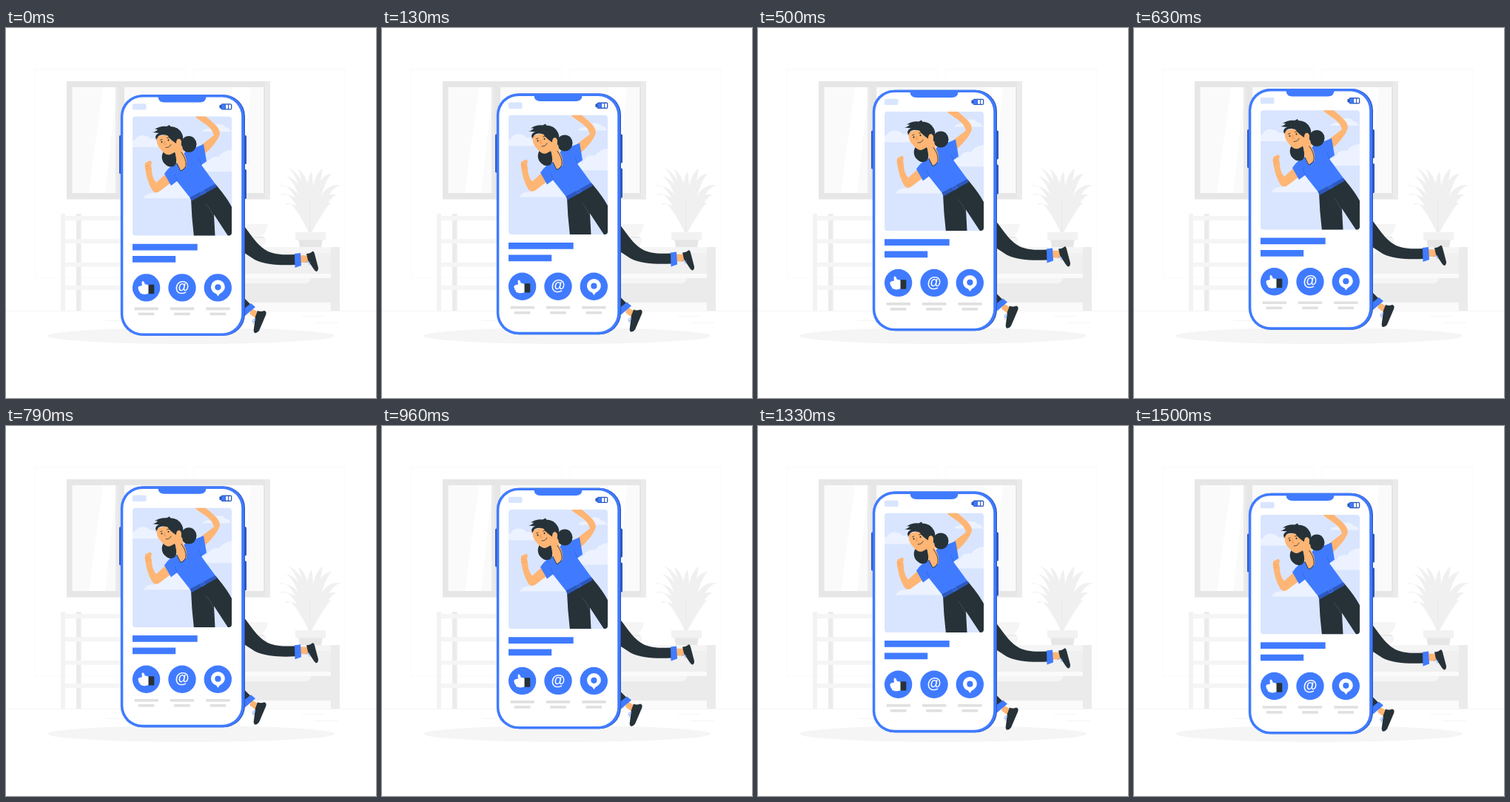
Recreate the animation shown at these times as an HTML page with a canvas. Size 500 px wide and 500 px high, loop 1.54 s.

```html
<!DOCTYPE html>
<html lang="en">
<head>
<meta charset="utf-8">
<title>Floating phone</title>
<style>
html, body { margin: 0; width: 100%; height: 100%; overflow: hidden; background: #fff; }
canvas { display: block; width: 500px; height: 500px; }
</style>
</head>
<body>
<canvas id="stage"></canvas>
<script>
const canvas = document.getElementById('stage');
const ctx = canvas.getContext('2d');
const ratio = window.devicePixelRatio || 1;
canvas.width = canvas.height = 500 * ratio;

const BLUE = '#407bff', NAVY = '#2d58bd', DARK = '#263238', SKIN = '#ffb573';
const SKY = '#d9e5ff', CLOUD = '#ecf2ff', WHITE = '#fff';
const LOOP = 1540, STEPS = 37, STEP = 1000 / 24, LIFT = 10;

function fill(d, color) {
  ctx.fillStyle = color;
  ctx.fill(new Path2D(d));
}

function line(d, color, width = 1) {
  ctx.strokeStyle = color;
  ctx.lineWidth = width;
  ctx.lineCap = ctx.lineJoin = 'round';
  ctx.stroke(new Path2D(d));
}

function box(x, y, right, bottom, color, radius = 0) {
  ctx.fillStyle = color;
  ctx.beginPath();
  ctx.roundRect(x, y, right - x, bottom - y, radius);
  ctx.fill();
}

function oval(x, y, rx, color, ry = rx) {
  ctx.fillStyle = color;
  ctx.beginPath();
  ctx.ellipse(x, y, rx, ry, 0, 0, Math.PI * 2);
  ctx.fill();
}

function drawWindow() {
  box(82, 72, 357, 231.5, '#e6e6e6');
  box(350, 72, 357, 231.5, '#ebebeb');
  box(89.5, 80, 148, 223, '#fafafa');
  box(160, 80, 348.5, 223, '#fafafa');
  fill('M131 80H148V95L134 223H112Z', WHITE);
  fill('M306 80H331L316 223H290Z', WHITE);
  box(148, 80, 152, 223, '#ebebeb');
  box(348.5, 80, 350, 223, '#e0e0e0');
}

function drawShelf() {
  box(95, 251, 101.5, 382, '#ebebeb');
  for (const y of [254, 285.3, 316.8, 348]) box(74, y, 160, y + 6, '#f5f5f5');
  box(74, 251, 80, 382, '#f3f3f3');
}

function drawCabinet() {
  box(300, 296, 451, 382, '#f5f5f5');
  box(439, 296, 451, 382, '#ebebeb');
  box(300, 304, 439, 332, '#f0f0f0');
  box(300, 332, 439, 338, '#fafafa');
  fill('M300 345H406Q411 344 412 338H439V371H300Z', '#ebebeb');
  box(300, 371, 439, 382, '#fafafa');
  fill('M310 265H354Q352 277 345 281L351 284V290L346 296H310Z', '#f5f5f5');
  box(310, 282, 349, 284, '#ebebeb');
}

function drawPlant() {
  // Each leaf: tip x, tip y, bend x, bend y
  const leaves = [
    [380, 188, 404, 198], [371, 199, 398, 194], [368, 214, 392, 202],
    [370, 226, 391, 213], [377, 239, 390, 226], [394, 190, 407, 198],
    [413, 194, 408, 208], [428, 190, 416, 200], [441, 197, 421, 196],
    [454, 213, 429, 204], [448, 226, 430, 217], [440, 237, 428, 228]
  ];
  for (const [x, y, bx, by] of leaves) {
    fill(`M409 276Q${bx - 6} ${by} ${x} ${y}Q${bx + 9} ${by + 5} 413 276Z`, '#f0f0f0');
  }
  line('M411 276V235', '#ebebeb', 1.5);
  fill('M395 285H428L426 296H397Z', '#e6e6e6');
  box(391, 276, 432, 286.5, '#f2f2f2', 1);
}

function drawRoom() {
  ctx.fillStyle = WHITE;
  ctx.fillRect(0, 0, 500, 500);
  line('M39.5 55.5H243V337.5H39.5ZM254.5 55.5H458V337.5H254.5Z', '#fafafa');
  box(0, 382, 500, 382.5, '#ebebeb');
  box(135, 395, 160, 395.5, '#ebebeb');
  box(400, 389.5, 430, 390, '#ebebeb');
  box(417, 398, 449, 398.5, '#ebebeb');
  drawWindow();
  drawShelf();
  drawCabinet();
  drawPlant();
  oval(250, 416, 194, '#f5f5f5', 11);
}

function drawLegs() {
  fill('M397 307L408 307.5V317L397 317Z', SKIN);
  fill('M310 255L322 268C336 286 344 301 364 305C374 307 382 306 392 306L391 320C370 321 350 320 336 313L310 296Z', DARK);
  fill('M390 305L398 304L399 321L390.5 324Z', BLUE);
  fill('M406 305Q411 305 414 302Q416 301 417 305L422 324Q422 329 419 329Q417 328 414 323L408 314Z', DARK);
  line('M405 317Q408 314 411 317M409 316L410 320', '#6f9cff', .7);

  fill('M332 379L341 384L337 392L329 386Z', SKIN);
  fill('M310 354L322 365L331 374L324 382L310 380Z', DARK);
  fill('M331 372L337 377L323 389L317 383Z', BLUE);
  fill('M340 382Q344 384 349 382Q353 383 351 388L342 409Q339 413 336 412Q334 410 335 406L337 390Z', DARK);
  line('M337 394Q332 393 333 397Q337 398 336 393M335 396L334 400', '#6f9cff', .7);
}

function drawClouds() {
  fill('M165 161V151Q171 153 174 151Q178 144 186 145Q193 146 195 150Q201 148 203 153Q208 153 209 161Z', CLOUD);
  fill('M265 140Q269 135 275 136Q278 130 287 130Q295 130 296 134Q302 134 304 140Z', CLOUD);
  fill('M253 194Q261 183 271 183Q277 172 288 174Q293 165 310 164V194Z', CLOUD);
  fill('M186 230Q190 222 200 223Q207 209 220 210Q230 202 248 212V230Z', CLOUD);
}

function drawArms() {
  fill('M188 190C187 185 188 181 191 181L195 179Q198 181 196 185L197 191Q197 202 203 209L216 197L223 209L207 221Q201 225 197 218C192 209 190 201 189 195Z', SKIN);
  fill('M254 117L267 117Q277 125 284 132Q291 140 288 146Q284 156 269 170L264 158L281 145Q279 137 271 131L258 122Z', SKIN);
  line('M189 187L193 186M190 191L194 189', '#e99b60', .6);
}

function drawBody() {
  fill('M250 231L284 212C292 222 304 236 310 253V290H306L281 252L283 290H255Q251 260 250 231Z', DARK);
  line('M270 238Q277 245 280 254', '#455a64', .7);
  fill('M214 197Q221 186 232 182L243 166Q256 162 267 157Q269 168 271 180L264 185L283 211L250 231L231 207L223 213Z', BLUE);
  line('M231 206L228 198M264 185L261 177', '#3267db', .8);
  fill('M248.5 229L283 210.5L285 214.5L250.5 234Z', NAVY);
  line('M263 222L267 219.5L269 223L265 225Z', BLUE, .8);
}

function drawHead() {
  oval(247, 157, 10.5, DARK, 11);
  fill('M214 166C209 171 210 180 215 184Q221 190 228 186Q233 180 228 167Z', DARK);
  fill('M228 164L238 159L240 169Q245 177 244 187L236 193L231 183Z', SKIN);
  line('M237 168Q244 177 243 186Q241 192 236 193L231 183', DARK, .9);
  fill('M204 147Q202 157 209 164Q216 173 222 171Q231 167 236 160Q239 153 232 148L220 143Z', SKIN);
  fill('M203 151L202 147Q203 143 207 142L198 141Q203 140 205 137L201 137Q209 132 217 133L221 131L222 133Q233 133 238 143Q241 150 237 154Q235 148 231 151L230 156Q222 151 218 145Q210 143 206 146Z', DARK);
  fill('M230 155Q231 149 235 150Q239 154 234 158Z', SKIN);
  oval(210.5, 154, .9, DARK, 1.2);
  oval(219.5, 151.5, .9, DARK, 1.2);
  line('M208.5 151.5L211 150.5M217.5 148.5L221 148', DARK, .8);
  line('M214.5 153L214 157L216 157', '#e28755', .8);
  line('M216 161.5Q221 162 223 157.5', DARK, .8);
}

function drawPicture() {
  ctx.save();
  ctx.beginPath();
  ctx.roundRect(171, 119.4, 134, 161.2, 4);
  ctx.clip();
  box(170, 118, 306, 282, SKY);
  drawClouds();
  drawArms();
  drawBody();
  drawHead();
  ctx.restore();
}

function drawIcons() {
  for (const x of [189.6, 238, 286.3]) {
    oval(x, 350.9, 18.7, BLUE);
    box(x - 16, 377.6, x + 16.3, 381.2, '#e0e0e0');
    box(x - 10.8, 384.6, x + 10.8, 388.2, '#e0e0e0');
  }
  fill('M193 347.5L187.5 346Q187 342 184 342Q183 344 184 348L179.5 349Q177.5 351 179 353Q178.5 355 180.5 356Q180.5 358.5 183 359Q188 361 193 358.5Z', WHITE);
  box(192.5, 346.8, 200.3, 359.2, DARK, 1);

  ctx.fillStyle = WHITE;
  ctx.font = 'bold 19.5px "Liberation Sans", Arial, sans-serif';
  ctx.textAlign = 'center';
  ctx.fillText('@', 238, 356);

  fill('M277 350A9.4 9.4 0 1 1 295.8 350C295.8 355 291 358 289 359L286.4 362.5L284 359C280 358 277 354 277 350Z', WHITE);
  oval(286.4, 350.3, 4.1, BLUE);
}

function drawPhone() {
  box(153, 145, 158, 197, NAVY, 1.5);
  box(318, 145, 325, 184, NAVY, 1.5);
  box(318, 191, 325, 231, NAVY, 1.5);
  box(157, 90.2, 323, 415.8, NAVY, 29);
  box(154.8, 90.2, 321.8, 415.8, BLUE, 29);
  box(158.3, 93.6, 318.2, 412.4, WHITE, 26);
  fill('M205.5 91.5H270.5V93Q270 100.5 262 100.5H214Q206 100.5 205.5 93Z', BLUE);

  box(170.8, 102.2, 189.6, 110.6, SKY, 2);
  box(288.4, 104, 292, 108.6, NAVY, 1);
  box(290.4, 102.2, 305.3, 110.6, NAVY, 2);
  box(291.5, 103.2, 296.4, 109.6, BLUE);
  box(297, 103.6, 300, 109.2, WHITE);
  box(301, 103.6, 304, 109.2, WHITE);

  drawPicture();
  box(171, 291.7, 258.7, 300.4, BLUE);
  box(171, 308.1, 229.2, 316.8, BLUE);
  drawIcons();
}

// Linear rise and fall, advanced at 24 steps per second
function floatOffset(time) {
  const step = Math.floor((time % LOOP + 4) / STEP);
  const phase = ((step + 1) % STEPS) / STEPS;
  const height = 1 - Math.abs(2 * phase - 1);
  return 2 * LIFT / STEPS - height * LIFT;
}

let start;
function render(now) {
  start ??= now;
  ctx.setTransform(ratio, 0, 0, ratio, 0, 0);
  drawRoom();
  ctx.translate(0, floatOffset(now - start));
  drawLegs();
  drawPhone();
  requestAnimationFrame(render);
}
requestAnimationFrame(render);
</script>
</body>
</html>
```
